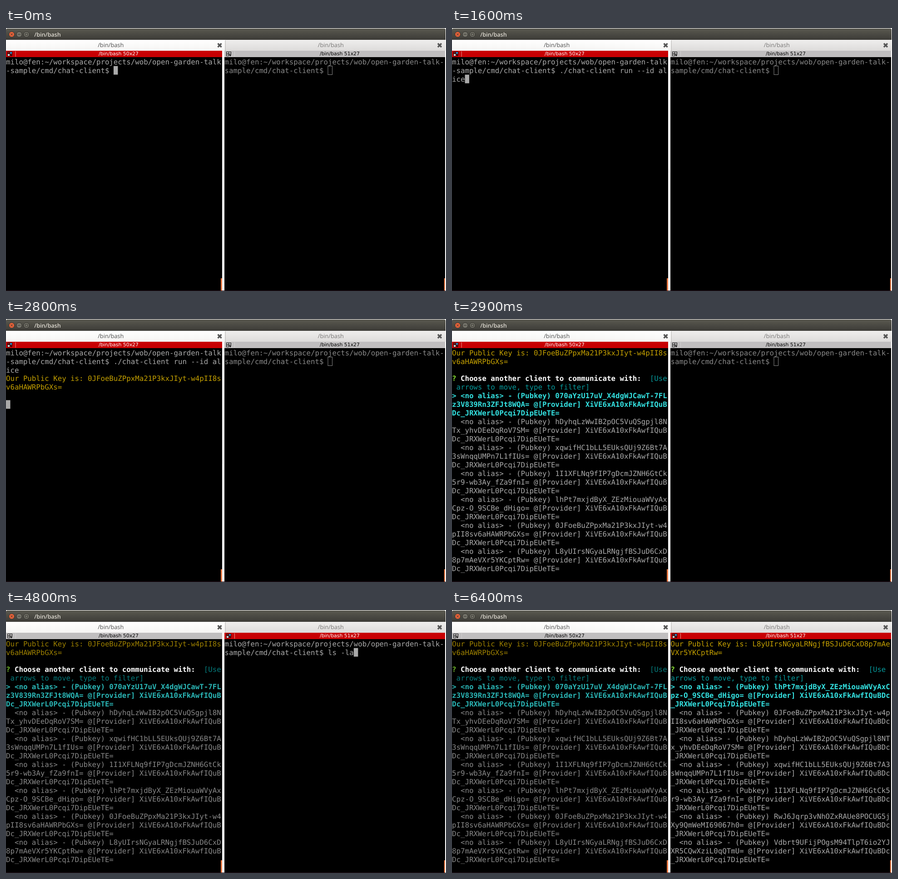
These frames come from a looping animation (969x578 px, 8000 ms). An HTML page:

```html
<!DOCTYPE html>
<html lang="en">
<head>
<meta charset="utf-8">
<title>Split terminal</title>
<style>
  html, body { margin: 0; width: 100%; height: 100%; overflow: hidden; background: #fff; }
  svg { display: block; width: 969px; height: 578px; }
  text { white-space: pre; text-rendering: geometricPrecision; }
  .ui { font: 12.75px "Open Sans", "Noto Sans", sans-serif; text-anchor: middle; }
  .bar { font: 10.9px "DejaVu Sans", sans-serif; text-anchor: middle; }
  .term { font: 15.74px "DejaVu Sans Mono", monospace; }
  .strong { font-weight: bold; }
</style>
</head>
<body>
<svg viewBox="0 0 969 578">
  <defs>
    <linearGradient id="title" x2="0" y2="1"><stop stop-color="#5a5950"/><stop offset="1" stop-color="#3c3b37"/></linearGradient>
    <linearGradient id="tabOn" x2="0" y2="1"><stop stop-color="#fff"/><stop offset="1" stop-color="#f5f4f3"/></linearGradient>
    <linearGradient id="tabOff" x2="0" y2="1"><stop stop-color="#efeeed"/><stop offset="1" stop-color="#dddbda"/></linearGradient>
    <path id="cross" d="M-4 -4L4 4M4 -4L-4 4" fill="none" stroke-width="3.4"/>
  </defs>
  <rect width="969" height="578" fill="#fff"/>
  <path d="M0 26V4Q0 1 3 1H965Q968 1 968 4V26Z" fill="url(#title)"/>
  <g stroke="#33322d">
    <circle cx="12.500" cy="14" r="6" fill="#e9633a"/>
    <circle cx="29" cy="14" r="6" fill="#74736a"/>
    <circle cx="45" cy="14" r="6" fill="#74736a"/>
    <path d="M10 11.500l5 5m0 -5l-5 5M26 14h6M42.500 11.500h5v5h-5z" fill="none"/>
  </g>
  <text class="ui" x="91.500" y="18.700" fill="#dfdbd2" style="font-size:12.6px;font-weight:600">/bin/bash</text>

  <rect y="26" width="482" height="24" fill="url(#tabOn)"/>
  <rect x="482" y="26" width="486" height="24" fill="url(#tabOff)"/>
  <rect x="482.500" y="27" width="1" height="23" fill="#b8b6b4"/>
  <text class="ui" x="230.700" y="42.300" fill="#4c4c4c">/bin/bash</text>
  <text class="ui" x="715.300" y="42.300" fill="#777675">/bin/bash</text>
  <use href="#cross" x="470.500" y="38" stroke="#555"/>
  <use href="#cross" x="955" y="38" stroke="#555"/>

  <g id="left"></g>
  <g id="right"></g>

  <path d="M478.500 310v1m0 2v1m0 2v1" stroke="#aaa"/>
  <rect x="473" y="550" width="3" height="27" fill="#e9763f"/>
  <rect x="964.800" y="550" width="2.200" height="27" fill="#e9763f"/>
  <rect y="577" width="968" height="1" fill="#2a1522"/>
</svg>

<script>
const LOOP = 8000, CELL = 9.475, ROW = 18.96, TOP = 64.6, BASELINE = 79.6;

// Each style holds its focused and unfocused colour.
const STYLES = {
  plain:  { colors: ['#aaaaaa', '#888888'] },
  key:    { colors: ['#c4a000', '#9d8000'] },
  hint:   { colors: ['#06989a', '#057a7b'] },
  mark:   { colors: ['#8ae234', '#6eb52a'], strong: true },
  ask:    { colors: ['#ffffff', '#ffffff'], strong: true },
  picked: { colors: ['#34e2e2', '#2ab5b5'], strong: true },
};

const PANES = {
  left:  { x: 0, width: 476, textX: 0, cols: 50, iconX: 2.5, lineX: 20.5, labelX: 248 },
  right: { x: 481, width: 486, textX: 481.6, cols: 51, iconX: 484.5, lineX: 503, labelX: 735 },
};

const PROMPT = 'milo@fen:~/workspace/projects/wob/open-garden-talk-sample/cmd/chat-client$ ';
const RUN = './chat-client run --id ';
const PROVIDER = 'XiVE6xA10xFkAwfIQuBDc_JRXWerL0Pcqi7DipEUeTE=';
const KEYS = {
  alice: '0JFoeBuZPpxMa21P3kxJIyt-w4pII8sv6aHAWRPbGXs=',
  bob:   'L8yUIrsNGyaLRNgjfBSJuD6CxD8p7mAeVXr5YKCptRw=',
  c: '070aYzU17uV_X4dgWJCawT-7FLz3V839Rn3ZFJt8WQA=',
  d: 'hDyhqLzWwIB2pOC5VuQSgpjl8NTx_yhvDEeDqRoV7SM=',
  e: 'xqwifHC1bLL5EUksQUj9Z6Bt7A3sWnqqUMPn7L1fIUs=',
  f: '1I1XFLNq9fIP7gDcmJZNH6GtCk5r9-wb3Ay_fZa9fnI=',
  g: 'lhPt7mxjdByX_ZEzMiouaWVyAxCpz-O_9SCBe_dHigo=',
  h: 'RwJ6Jqrp3vNhOZxRAUe8POCUG5jXy9QmWeMI69067h0=',
  i: 'Vdbrt9UFijPOgsM94TlpT6io2YJXR5CQwXziL0qQTmU=',
};

// A screen is a list of paragraphs; a paragraph is a list of [style, text] runs.
const shell = (typed = '') => [[['plain', PROMPT + typed]]];
const keyLine = name => [['key', 'Our Public Key is: ' + KEYS[name]]];
const menu = (name, others) => [
  keyLine(name),
  [],
  [['mark', '? '], ['ask', 'Choose another client to communicate with:'],
   ['hint', '  [Use arrows to move, type to filter]']],
  ...others.map((id, i) => [[i ? 'plain' : 'picked',
    `${i ? ' ' : '>'} <no alias> - (Pubkey) ${KEYS[id]} @[Provider] ${PROVIDER}`]]),
];

const aliceRun = shell(RUN + 'alice');
const bobRun = shell(RUN + 'bob');
const aliceMenu = menu('alice', ['c', 'd', 'e', 'f', 'g', 'alice', 'bob']);
const bobMenu = menu('bob', ['g', 'alice', 'd', 'e', 'f', 'h', 'i']);

// [start ms, screen, cursor, focused]
const TIMELINE = {
  left: [
    [0, shell(), 'solid', true],
    [200, shell(), 'none', true],
    [800, shell(), 'solid', true],
    [1300, shell('clear'), 'solid', true],
    [1600, aliceRun, 'solid', true],
    [2200, aliceRun, 'none', true],
    [2800, [...aliceRun, keyLine('alice'), [], []], 'solid', true],
    [2900, aliceMenu, 'none', true],
    [3800, aliceMenu, 'none', false],
  ],
  right: [
    [0, shell(), 'hollow', false],
    [3800, shell(), 'solid', true],
    [4400, shell(), 'none', true],
    [4700, shell('clear'), 'solid', true],
    [4800, shell('ls -la'), 'solid', true],
    [5200, bobRun, 'solid', true],
    [5800, bobRun, 'none', true],
    [6400, bobMenu, 'none', true],
  ],
};

const escapeText = s => s.replace(/&/g, '&amp;').replace(/</g, '&lt;');
const rect = (x, y, w, h, fill, extra = '') =>
  `<rect x="${x}" y="${y}" width="${w}" height="${h}" fill="${fill}" ${extra}/>`;

function icon(x, focused) {
  const outline = 'stroke="#111"';
  const [a, b, c] = focused ? ['#8c1010', '#3d8fd1', '#eee'] : ['none', 'none', 'none'];
  return rect(x + 1, 52.5, 5, 4.5, a, outline) + rect(x + 6, 52.5, 5, 4.5, b, outline) +
    rect(x + 1, 57, 5, 4.5, c, outline) +
    `<path d="M${x + 6.5} 58.500h5.500l-2.750 4z" fill="#111"/>`;
}

function header(pane, focused) {
  const bg = focused ? '#c80003' : '#c0bebf';
  return rect(pane.x, 50, pane.width, 14, bg) + icon(pane.iconX, focused) +
    rect(pane.lineX, 51, 1, 12, focused ? '#e0a090' : '#d2d0d0') +
    `<text class="bar" x="${pane.labelX}" y="60.300" fill="${focused ? '#fff' : '#000'}">` +
    `/bin/bash ${pane.cols}x27</text>`;
}

function screenText(pane, screen, cursor, focused) {
  const shade = focused ? 0 : 1;
  let row = -1, col = 0, out = '';
  for (const paragraph of screen) {
    row++;
    col = 0;
    for (let [name, text] of paragraph) {
      const { colors, strong } = STYLES[name];
      while (text) {
        if (col === pane.cols) { row++; col = 0; }
        const part = text.slice(0, pane.cols - col);
        text = text.slice(part.length);
        out += `<text class="term${strong ? ' strong' : ''}" x="${pane.textX + col * CELL}" ` +
          `y="${BASELINE + row * ROW}" fill="${colors[shade]}">${escapeText(part)}</text>`;
        col += part.length;
      }
    }
  }
  const x = pane.textX + col * CELL, y = TOP + row * ROW;
  if (cursor === 'solid') out += rect(x, y, CELL, ROW, '#aaa');
  if (cursor === 'hollow') out += rect(x, y, CELL, ROW, 'none', 'stroke="#888"');
  return out;
}

const shown = {};

function draw(time) {
  for (const [id, pane] of Object.entries(PANES)) {
    const step = TIMELINE[id].findLast(([start]) => start <= time);
    if (shown[id] === step) continue;
    shown[id] = step;
    const [, screen, cursor, focused] = step;
    document.getElementById(id).innerHTML = rect(pane.x, 64, pane.width, 513, '#000') +
      header(pane, focused) + screenText(pane, screen, cursor, focused);
  }
}

const begin = performance.now();
function tick() {
  draw((performance.now() - begin) % LOOP);
  requestAnimationFrame(tick);
}
tick();
</script>
</body>
</html>
```
